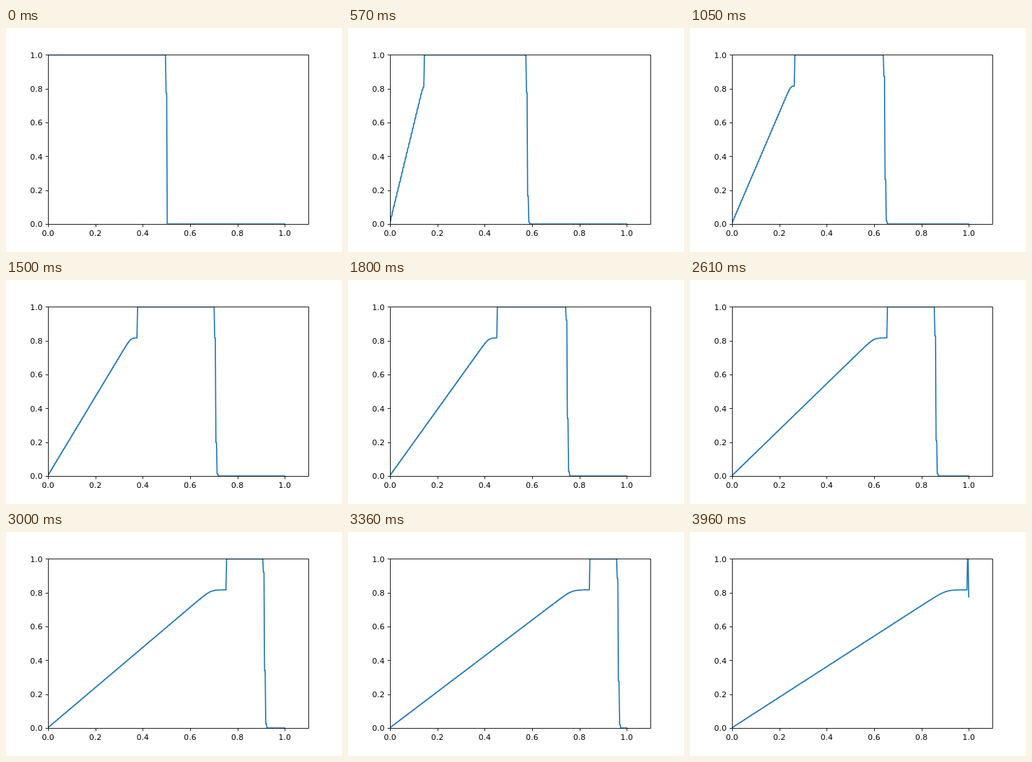
An HTML page with a canvas for the animation above (3.99 s loop, 480 by 320 pixels).

```html
<!DOCTYPE html>
<html>
<head>
<meta charset="utf-8">
<style>
html, body { margin: 0; height: 100%; overflow: hidden; background: #fff; }
canvas { display: block; }
</style>
</head>
<body>
<canvas id="plot" width="480" height="320"></canvas>
<script>
const ctx = document.getElementById('plot').getContext('2d');
const FRAME_MS = 30, FRAMES = 133, LAST = 399;
const PLATEAU = 0.817, ROUNDING = 0.015, EDGE = 0.775;
const px = x => 60 + x * 372 / 1.1;
const py = u => 280 - u * 241.6;
const snap = v => Math.floor(v + 0.5) + 0.5;

// Falling front: d is the distance from its middle, in cells.
function front(d, n) {
  if (n === 0) return Math.min(1, Math.max(0, 0.5 - d));
  const e = d < 0 ? 2.75 * d + 1.2 * d ** 5 : 2.95 * d;
  return 1 / (1 + Math.exp(e));
}

// Rising ramp that bends softly into the plateau.
function ramp(center, n) {
  const line = (center + 0.7) / (3.3 * (n + 2));
  return PLATEAU - ROUNDING * Math.log(1 + Math.exp((PLATEAU - line) / ROUNDING));
}

// Samples share cells in pairs; the pairing shifts by one sample each step.
function height(i, n) {
  const shift = n % 2 ? 0 : 1;
  const center = Math.floor((i + shift) / 2) * 2 - shift + 0.5;
  if (n > 0 && i < 3 * n + 1) return ramp(center, n);
  const u = front((center - 200.05 - 1.65 * n) / 2, n);
  return i === LAST ? Math.min(u, EDGE) : u;
}

function drawCurve(n) {
  ctx.save();
  ctx.beginPath();
  ctx.rect(60, 38, 372, 242);
  ctx.clip();
  ctx.beginPath();
  for (let i = 0; i <= LAST; i++) ctx.lineTo(px(i / LAST), py(height(i, n)));
  ctx.strokeStyle = '#1f77b4';
  ctx.lineWidth = 1.667;
  ctx.lineJoin = 'round';
  ctx.lineCap = 'square';
  ctx.stroke();
  ctx.restore();
}

function drawAxes() {
  ctx.strokeStyle = ctx.fillStyle = '#000';
  ctx.lineWidth = 0.889;
  ctx.font = '11.11px "DejaVu Sans", sans-serif';
  ctx.beginPath();
  ctx.rect(60.5, 38.5, 372, 242);
  for (let k = 0; k <= 5; k++) {
    const v = k / 5, x = px(v), y = py(v), label = v.toFixed(1);
    ctx.moveTo(snap(x), 280.5);
    ctx.lineTo(snap(x), 284.4);
    ctx.moveTo(60.5, snap(y));
    ctx.lineTo(56.6, snap(y));
    ctx.textAlign = 'center';
    ctx.fillText(label, x, 297);
    ctx.textAlign = 'right';
    ctx.fillText(label, 52.2, Math.round(y + 4.2));
  }
  ctx.stroke();
}

const start = performance.now();
function draw() {
  const t = Math.max(0, performance.now() - start);
  ctx.fillStyle = '#fff';
  ctx.fillRect(0, 0, 480, 320);
  drawCurve(Math.floor(t / FRAME_MS) % FRAMES);
  drawAxes();
  requestAnimationFrame(draw);
}
draw();
</script>
</body>
</html>
```
